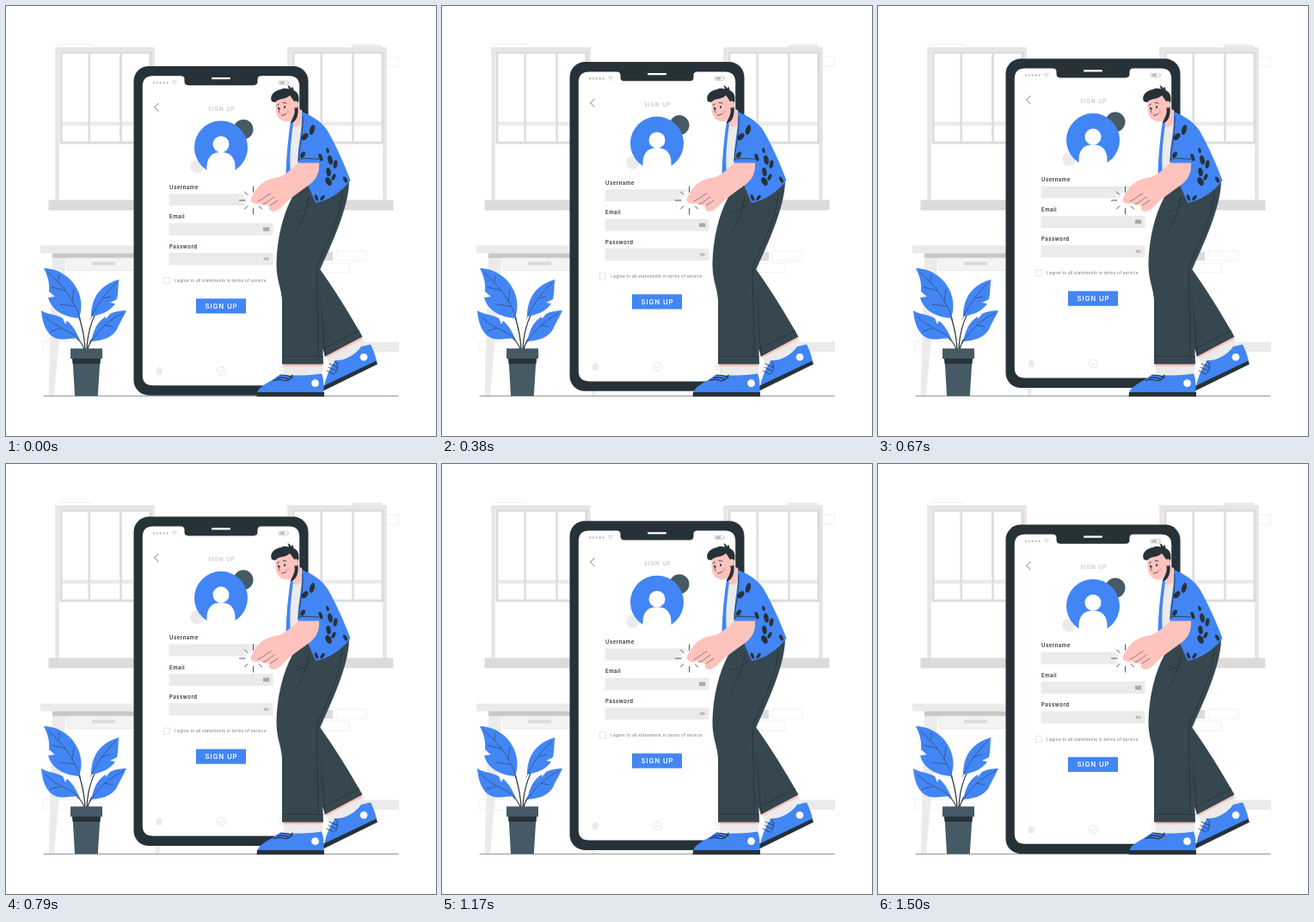
These frames come from a looping animation (500x500 px, 1.54 s). An HTML page:

```html
<!DOCTYPE html>
<html lang="en">
<head>
<meta charset="utf-8">
<title>Sign up</title>
<style>
  html, body { margin: 0; width: 100%; height: 100%; overflow: hidden; background: #fff; }
  svg { display: block; width: 100%; height: 100%; }
  text { font-family: Inter, "Open Sans", sans-serif; font-weight: 600; }
  .blue { fill: #4285f4; }
  .ink { fill: #263238; }
  .slate { fill: #455a64; }
  .pants { fill: #37474f; }
  .skin { fill: #ffc3bd; }
  .pale { fill: #ebebeb; }
  .grey { fill: #dbdbdb; }
  .white { fill: #fff; }
  .line { fill: none; stroke: #263238; stroke-width: .8; stroke-linecap: round; stroke-linejoin: round; }
  .fine { stroke-width: .5; }
  .bold { stroke-width: 1.2; }
  .thin { fill: none; stroke: #ededed; stroke-width: .8; }
  .label { font-size: 6px; letter-spacing: .5px; fill: #263238; }
  .terms { font-size: 4.8px; font-weight: 400; letter-spacing: .2px; fill: #777; }
</style>
</head>
<body>
<svg viewBox="0 0 500 500">
  <defs>
    <radialGradient id="glow">
      <stop offset=".35" stop-color="#fff"/>
      <stop offset="1" stop-color="#fff" stop-opacity="0"/>
    </radialGradient>
    <clipPath id="disc"><circle cx="250" cy="165" r="32"/></clipPath>
    <g id="window">
      <path fill="none" stroke="#e6e6e6" stroke-width="4.5" d="M59.5 226V50.3H170.5V226"/>
      <path class="pale" d="M64 134.5h104v4.5H64z"/>
      <path fill="none" stroke="#dcdcdc" stroke-width="3" d="M64 54H168V159H64z"/>
      <path fill="none" stroke="#dedede" stroke-width="2.6" d="M96.7 54V159M133.5 54V159"/>
    </g>
  </defs>

  <g id="room">
    <use href="#window"/>
    <use href="#window" x="270"/>
    <path class="grey" d="M49.5 225.5H180V237.5H49.5zM320 225.5H450.5V237.5H320z"/>
    <path class="pale" d="M402 45h35v3h-35z"/>
    <path class="thin" d="M62 47V44.5H98V47M442 59H456.5V70H442"/>
    <path class="pale" d="M54 290H70L56 453.5H49.5zM174 300h4.5V453.5H174z"/>
    <path class="pale" d="M40 278.5H180V287.5H40z"/>
    <path fill="#c7c7c7" d="M54 287.5H180V293H54z"/>
    <path fill="#f3f3f3" stroke="#e6e6e6" stroke-width=".8" d="M71 293H180V307.5H71z"/>
    <path class="grey" d="M100 297.5h27v4h-27z"/>
    <path class="thin" d="M43 390.5H80V402H43zM78 376.5H95V388H78z"/>
    <path class="thin" d="M384 285H419V296H384zM365 299H399V310H365z"/>
    <path class="grey" d="M366 286h14v10h-14z"/>
    <path class="pale" d="M405 390.5h52V402h-52z"/>
    <path class="line fine" d="M44 453.5H456"/>
  </g>

  <g id="phone">
    <rect class="ink" x="148.5" y="70.5" width="203" height="382.7" rx="17.5"/>
    <path class="white" d="M171 81.8H203Q207.500 81.8 207.5 86V88.300Q207.5 92.700 212 92.700H288Q292.5 92.700 292.5 88.300V86Q292.5 81.8 297 81.8H329Q341.2 81.8 341.2 94V430Q341.2 441.800 329 441.800H171Q158.800 441.800 158.800 430V94Q158.800 81.8 171 81.8z"/>
    <path fill="none" stroke="#fff" stroke-width="2.2" stroke-linecap="round" d="M240 84.6H260"/>
    <path fill="none" stroke="#c4c4c4" stroke-width="2.6" stroke-linecap="round" stroke-dasharray="0 3.9" d="M172 89.8H188"/>
    <path fill="none" stroke="#cfcfcf" d="M193 88.800Q196 86 199 88.800M194.5 90.300Q196 89 197.5 90.300M195.5 91.800h1"/>
    <rect x="317.5" y="87.5" width="10" height="4.5" rx="1" fill="none" stroke="#c4c4c4" stroke-width=".8"/>
    <path fill="#b5b5b5" d="M318.5 88.5h5.5v2.5h-5.5zM328 89h1v1.5h-1z"/>
    <path fill="none" stroke="#b5b5b5" stroke-width="1.4" d="M177.5 113.5L172.7 118.2L177.5 123"/>
    <text x="250.8" y="122.2" text-anchor="middle" font-size="6.1" letter-spacing="1" fill="#c6c6c6">SIGN UP</text>

    <circle class="slate" cx="276" cy="144" r="11.5"/>
    <circle class="pale" cx="222" cy="187.3" r="7.8"/>
    <circle class="blue" cx="250" cy="165" r="31"/>
    <g class="white" clip-path="url(#disc)">
      <circle cx="250" cy="161.3" r="9.5"/>
      <path d="M233.5 200V188C233.5 176 240 170.5 250 170.5S266.5 176 266.5 188V200z"/>
    </g>

    <g class="label">
      <text x="190" y="213.4">Username</text>
      <text x="190" y="247.8">Email</text>
      <text x="190" y="282.3">Password</text>
    </g>
    <path class="pale" d="M189.5 218.7h121v14h-121zM189.5 253.1h121v14h-121zM189.5 287.5h121v14h-121z"/>
    <rect x="299" y="257.8" width="7.2" height="4.6" rx=".6" fill="#a8a8a8"/>
    <path fill="#b0b0b0" d="M299 294.5Q302.6 290.800 306.2 294.5Q302.6 298.200 299 294.5z"/>
    <circle class="pale" cx="302.6" cy="294.5" r=".9"/>
    <rect x="183.3" y="316.2" width="7.2" height="7.2" fill="#fff" stroke="#e0e0e0" stroke-width=".8"/>
    <text class="terms" x="196" y="321.7">I agree to all statements in terms of service</text>
    <path class="blue" d="M221 340.7h58v17.3h-58z"/>
    <text x="250.5" y="352.2" text-anchor="middle" font-size="7.8" letter-spacing=".9" fill="#fff">SIGN UP</text>

    <g fill="none" stroke="#e9e9e9" stroke-width="1.1">
      <path class="pale" d="M174.5 424.5L178.2 420.8L182 424.5M175.7 424.5V428.5H180.7V424.5"/>
      <circle cx="250.3" cy="425" r="4.8"/>
      <path d="M248 425l1.700 1.700l3-3M317 421h8M317 424.5h8M317 428h8"/>
    </g>
  </g>

  <g id="plant">
    <path class="line bold" d="M92 399C91 380 85 352 70 331M94 399C95 374 104 354 115 339M91 399C86 384 72 378 56 375M95 399C99 384 111 372 126 363"/>
    <path class="blue" d="M44 305C60 305 77 315 84 332C89 344 88 354 85 363C68 362 53 354 49 339L57 338L50 332C51 321 48 313 44 305z"/>
    <path class="blue" d="M41 354C48 359 57 358 66 363L69 370L71 366C78 372 82 379 85 387C75 385 67 390 57 386C46 381 42 367 41 354z"/>
    <path class="blue" d="M131.5 318C113 323 99 336 99 361C111 359 121 355 127 346L121 345L129 341C131 332 130 325 131.5 318z"/>
    <path class="blue" d="M140 354C133 354 127 355 121 358L116 364V361C106 367 101 378 99.5 390C112 389 123 386 129 376C133 367 137 361 140 354z"/>
    <path class="line fine" d="M49 310C64 323 80 342 87 365M61 321L62 313M69 331L53 327M77 343L79 329M80 349L63 347M46 361C57 375 73 375 86 388M63 375L52 378M98 364C105 348 117 332 128 322M113 340L121 338M98 392C108 376 120 365 136 357M115 371L124 373"/>
    <path class="slate" d="M77.5 410H109.5L106.8 453.5H80z"/>
    <path class="ink" d="M77 410H110L109.5 416H77.5z"/>
    <path class="slate" d="M75 398.3h37V410H75z"/>
  </g>

  <circle cx="287.5" cy="226" r="14" fill="url(#glow)"/>
  <g id="sparks"></g>

  <g id="man">
    <path class="skin" d="M370 405L412 382L415 388L374 411z"/>
    <path class="pale" d="M373 409L414.5 387.5L419 398L378 424z"/>
    <path class="blue" d="M370 443C372 431 377 420 383 412C393 413 406 406 413 396L424 393.5C427 399 429.5 406 431 413L370 443z"/>
    <path class="ink" d="M368.5 442L430.5 412.5L432 416.500L369 447.500z"/>
    <circle class="white" cx="416" cy="408.3" r="4.3"/>
    <path class="line" d="M376 416l9 4M375 420l8 4M373 424l8 4M382 413c4 1 5 8 1 14"/>
    <path class="pants" d="M340 315L365 306Q388 338 414.5 384.5L371 407.500L360 372z"/>
    <path class="line" d="M368.5 399L410.5 377.5M364 318L371 407"/>

    <path class="skin" d="M322.5 414H368V420H322.5z"/>
    <path class="pale" d="M323 419H368V432H323z"/>
    <path class="blue" d="M292 449.5C295 441 308 437 318 429C332 430 350 430 367 427.5C370 435 369.5 443 369.5 449.5z"/>
    <path class="ink" d="M292 449H370V454.3H291.5z"/>
    <circle class="white" cx="359.5" cy="438.7" r="4.4"/>
    <path class="line bold" d="M319 429c5 0 10 1 14 3M315 432.5c5-1 9-1 13 1M311 435.5c5-2 10-1 13 0M333 429c-1 4-4 6-8 7"/>

    <path class="pants" d="M349 208L399 205C398 236 378 278 365 307L369 416.5H321V342C320 326 314.5 320 314.5 299C315 271 322 242 333 222z"/>
    <path class="line" d="M321.5 407.5H368.5M391 215C390 245 372 278 362 302C360 315 363 350 363 407M356 229C349 236 340 240 336 240M352 222C350 238 343 252 337 263"/>

    <path fill="#ebebeb" d="M332 134L346 130L346 200L329 196z"/>
    <path class="blue" d="M331 134C328 154 326 174 325.5 195L331 195C329 174 332 152 334 137z"/>
    <path class="skin" d="M333 117L344 121L346 129C344 138 340 143 334 139z"/>
    <path class="blue" d="M344 123C357 128 369 136 375 147C384 163 394 185 400.5 203C390 216 376 226 360 229L354 215L339.5 182C339 161 345 145 344 123z"/>
    <g id="spots" class="ink"></g>

    <path class="skin" d="M340 182.5H364C365 195 360 203 351 209C340 217 331 223 323 231C319 236 313 240 308.5 238.500C305 237 305 234 307 231.500C303 232 299 231 296 229.500C290 231 284 229 284.5 224.5C287 219 290 214 294 209.500C299 204 308 200 318 199C327 195 334 188 340 182.5z"/>
    <path class="line fine" d="M293 227C299 225 303 220 308 218M299 230.5C304 229 307 225 312 222M307 232C311 230 313 228 316 226"/>
    <path class="line" d="M340 178.5C348 176 356 178 364 178M345 128C346 146 341 163 340 180"/>

    <path class="skin" d="M315 107C312 117 313 128 319 132C325 136 333 135 337 128L341 110C337 99 319 98 315 107z"/>
    <path class="ink" d="M309 111C306 104 312 98 320 97C322 95 326 95.5 329 96.5L327.5 92C330 93 331 95 332 96L333 93.500C334 95 334.5 97 334.5 98C340 100 341.5 106 340 112L335 111C333 108 332 106 330 104C325 109 317 107 313 112z"/>
    <path class="ink" d="M335.5 108L340 110C339 118 341 126 337 132C335 135 332 137 331 136C331 133 337 127 335.5 119z"/>
    <ellipse class="skin" cx="337" cy="114.5" rx="3" ry="4"/>
    <path class="line" d="M315 115.5L317.5 114M322 112.5L326 113M318.5 119.5C317 122 316.5 123 318.5 124M320.5 127C323 127 325 126 326 125"/>
    <ellipse class="ink" cx="317" cy="119" rx="1" ry="1.5"/>
    <ellipse class="ink" cx="324" cy="117.5" rx="1" ry="1.5"/>
    <circle cx="328" cy="123" r="2.2" fill="#ff9c96" opacity=".5"/>
  </g>
</svg>
<script>
  const NS = "http://www.w3.org/2000/svg";
  const byId = id => document.getElementById(id);
  function add(parent, tag, attrs) {
    const el = document.createElementNS(NS, tag);
    for (const key in attrs) el.setAttribute(key, attrs[key]);
    parent.append(el);
  }

  // Shirt spots: x, y, rx, ry, tilt
  [
    [356, 144, 2.8, 6, 15], [347.5, 152, 3, 5, 40], [345, 173, 2.4, 4, 30],
    [374, 168, 1.7, 3, -15], [366, 176, 2, 4.5, -20], [377, 179, 2.8, 5.5, -12],
    [383, 184, 2.3, 4.8, 10], [375, 193, 2.6, 5, -10], [381, 199, 2, 4, 25],
    [375, 204, 3.2, 5.3, -30], [394.5, 202, 2, 3.8, -25],
    [368, 223, 1.8, 3.8, 35], [361, 223, 1.8, 4, -20]
  ].forEach(([x, y, rx, ry, tilt]) =>
    add(byId("spots"), "ellipse", { rx, ry, transform: `translate(${x} ${y}) rotate(${tilt})` }));

  for (let a = 0; a < 360; a += 45) {
    add(byId("sparks"), "path", {
      class: "line",
      d: a % 90 ? "M9.5 0H14" : "M9.5 0H16",
      transform: `translate(287.5 226) rotate(${a})`
    });
  }

  // The phone floats up and back linearly, on a 24 fps grid
  const LOOP = 1540, STEPS = 37, RISE = 10;
  const phone = byId("phone");
  function draw() {
    const t = performance.now() % LOOP;
    const step = Math.min(STEPS - 1, Math.floor((t + 5) * 24 / 1000));
    const lift = RISE * (1 - Math.abs(2 * (step + 1) / STEPS - 1));
    phone.setAttribute("transform", `translate(0 ${-lift})`);
    requestAnimationFrame(draw);
  }
  draw();
</script>
</body>
</html>
```
